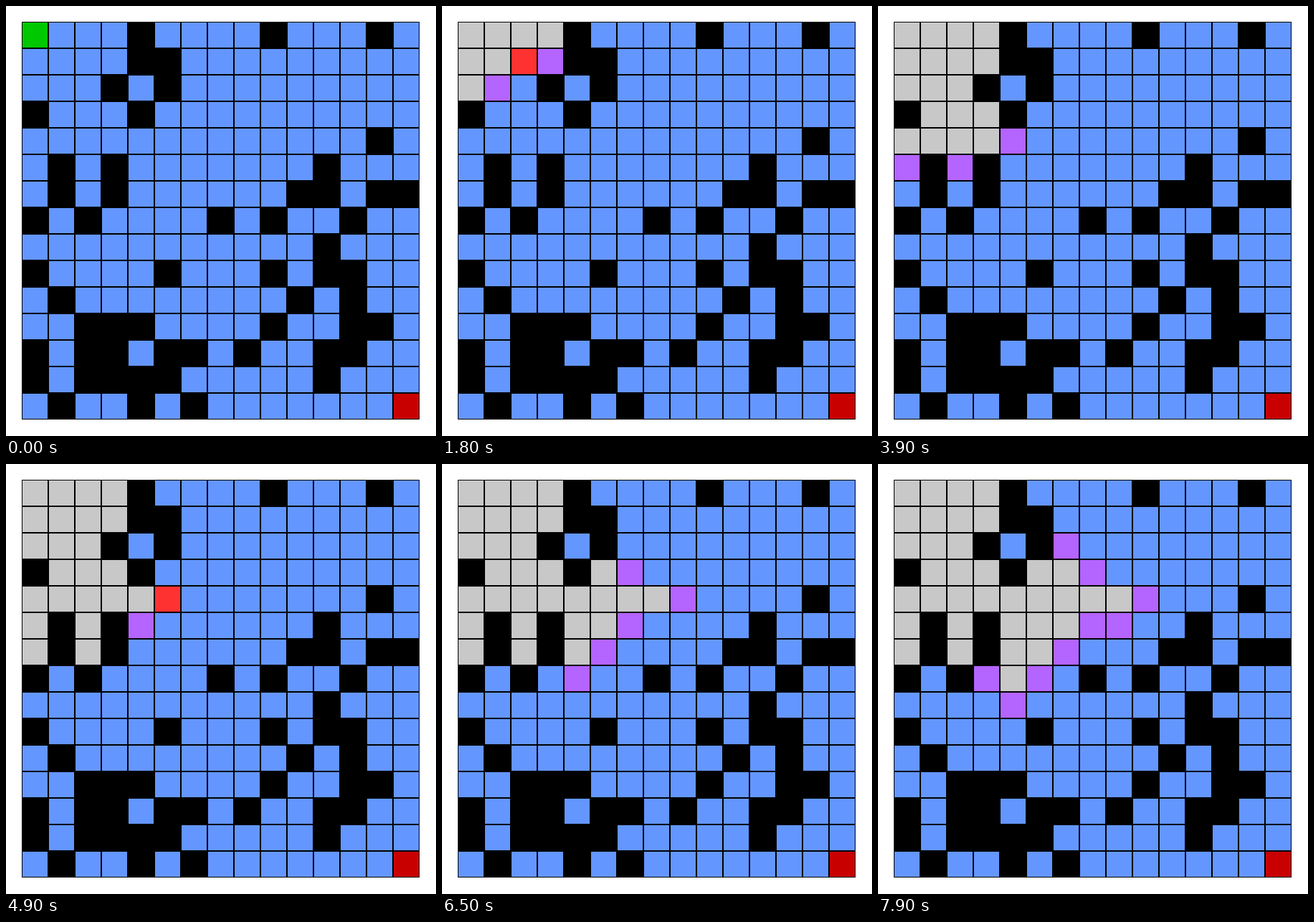
A matplotlib script that plays this animation: 600 px wide and 600 px high, repeating every 8000 ms.

```python
import matplotlib.pyplot as plt
from matplotlib.animation import FuncAnimation
from matplotlib.patches import Rectangle

# Breadth-first search spreading over a walled grid.
SIZE, N, CELL, ORIGIN = 600, 15, 37, 22
FRAMES, INTERVAL = 80, 100

FREE = "#6496ff"
WALL = "#000000"
START = "#00c800"
GOAL = "#c80000"
QUEUED = "#b464ff"
CURRENT = "#ff3232"
DONE = "#c8c8c8"

WALL_COLUMNS = [
    (4, 9, 13), (4, 5), (3, 5), (0, 4), (13,),
    (1, 3, 11), (1, 3, 10, 11, 13, 14), (0, 2, 7, 9, 12), (11,),
    (0, 5, 9, 11, 12), (1, 10, 12), (2, 3, 4, 9, 12, 13),
    (0, 2, 3, 5, 6, 8, 11, 12), (0, 2, 3, 4, 5, 11), (1, 4, 6),
]
WALLS = {(r, c) for r, cols in enumerate(WALL_COLUMNS) for c in cols}
STEPS = [(0, 1), (1, 0), (0, -1), (-1, 0)]  # right, down, left, up


def search(start):
    """Yield, for each tick, the cells that change colour."""
    queue, seen = [start], {start}
    yield {start: QUEUED}
    previous = None
    while queue:
        cell = queue.pop(0)
        changes = {cell: CURRENT}
        if previous:
            changes[previous] = DONE
        yield changes
        for dr, dc in STEPS:
            r, c = near = cell[0] + dr, cell[1] + dc
            inside = 0 <= r < N and 0 <= c < N
            if inside and near not in WALLS and near not in seen:
                seen.add(near)
                queue.append(near)
                yield {cell: DONE, near: QUEUED}
        previous = cell


def build_states():
    state = {(r, c): WALL if (r, c) in WALLS else FREE
             for r in range(N) for c in range(N)}
    state[0, 0] = START
    state[N - 1, N - 1] = GOAL
    states = [dict(state)]
    ticks = search((0, 0))
    while len(states) < FRAMES:
        state.update(next(ticks))
        states.append(dict(state))
    return states


fig = plt.figure(figsize=(6, 6), dpi=100, facecolor="white")
ax = fig.add_axes([0, 0, 1, 1])
ax.set_xlim(0, SIZE)
ax.set_ylim(SIZE, 0)
ax.axis("off")


def add_square(x, y, side, color):
    return ax.add_patch(Rectangle((x, y), side, side, facecolor=color,
                                  linewidth=0, antialiased=False))


add_square(ORIGIN, ORIGIN, N * CELL, WALL)
states = build_states()
squares = {
    (r, c): add_square(ORIGIN + c * CELL + 1, ORIGIN + r * CELL + 1,
                       CELL - 2, color)
    for (r, c), color in states[0].items()
}


def update(i):
    for cell, square in squares.items():
        square.set_facecolor(states[i][cell])
    return list(squares.values())


anim = FuncAnimation(fig, update, frames=FRAMES, interval=INTERVAL,
                     repeat=True, repeat_delay=0, blit=False)
plt.show()
```
